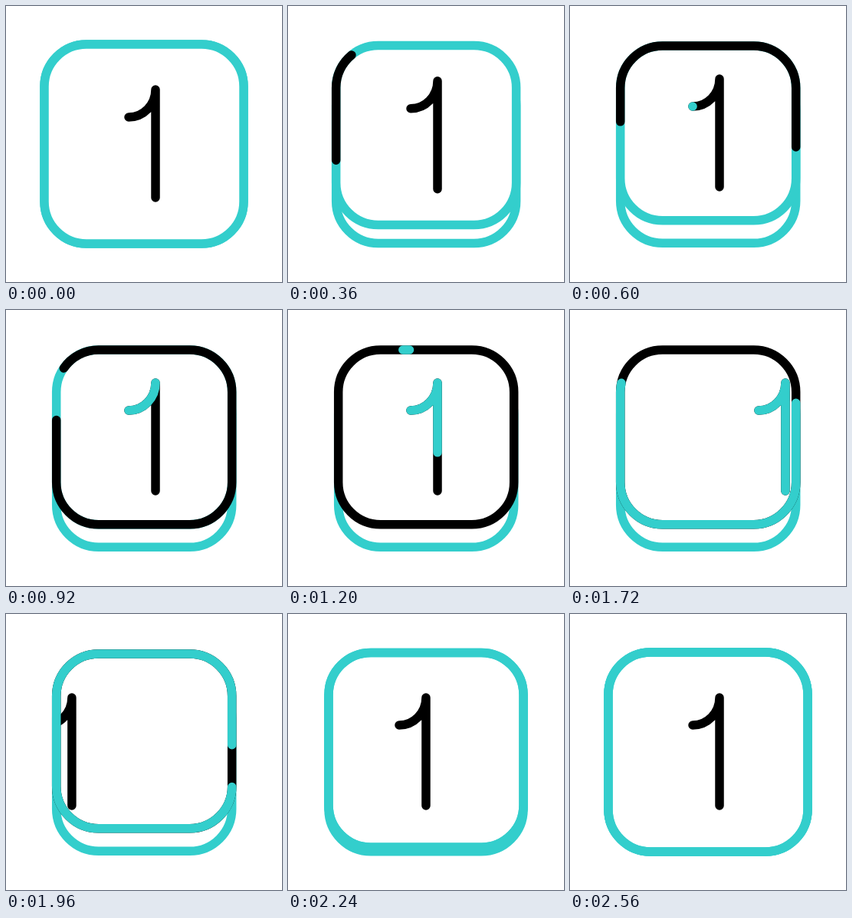
Write an HTML page that moves like this. It is 360 by 360 pixels and loops after 2.8 s.

```html
<!DOCTYPE html>
<html lang="en">
<head>
<meta charset="utf-8">
<style>
  html, body { margin: 0; width: 100%; height: 100%; overflow: hidden; background: #fff; }
  svg { display: block; width: 100vw; height: 100vh; }
  path { fill: none; stroke-width: 11.5; stroke-linecap: round; stroke-linejoin: round; }
  .teal { stroke: #33cecc; }
  .black { stroke: #000; }
  #face { fill: #fff; }
</style>
</head>
<body>
<svg viewBox="0 0 360 360">
  <defs>
    <clipPath id="window"><path id="clip"/></clipPath>
  </defs>
  <path id="base" class="teal"/>
  <path id="face"/>
  <g clip-path="url(#window)">
    <g id="current">
      <path class="black" d="M160 145A35 36 0 0 0 195 109V250"/>
      <path id="ink" class="teal" pathLength="1" d="M160 145A35 36 0 0 0 195 109V250"/>
    </g>
    <g id="next">
      <path class="black" d="M160 145A35 36 0 0 0 195 109V250"/>
    </g>
  </g>
  <path id="rim"/>
  <path id="runner" pathLength="1"/>
</svg>
<script>
  const LOOP = 2800, STEP = 40, RADIUS = 55, PERIMETER = 818;
  const $ = id => document.getElementById(id);
  const [clip, base, face, current, ink, next, rim, runner] =
    ['clip', 'base', 'face', 'current', 'ink', 'next', 'rim', 'runner'].map($);

  const span = (t, from, length) => Math.min(1, Math.max(0, (t - from) / length));
  const sine = u => (1 - Math.cos(Math.PI * u)) / 2;
  const cubic = u => u < 0.5 ? 4 * u ** 3 : 1 - 4 * (1 - u) ** 3;

  function roundRect(left, top, right, bottom) {
    const r = RADIUS, w = right - left - 2 * r, h = bottom - top - 2 * r;
    const arc = (dx, dy) => `a${r} ${r} 0 0 1 ${dx} ${dy}`;
    return `M${left + r} ${top}h${w}${arc(r, r)}v${h}${arc(-r, r)}` +
      `h${-w}${arc(-r, -r)}v${-h}${arc(r, -r)}z`;
  }

  // Shows the part of a path from start to start + length, wrapping at its end.
  function trim(path, start, length) {
    path.style.display = length > 0 ? '' : 'none';
    const full = length >= 1;
    path.setAttribute('stroke-dasharray', full ? 'none' : `${length} ${1 - length}`);
    path.setAttribute('stroke-dashoffset', full ? 0 : -(start % 1));
  }

  // The runner's tail keeps speeding up along the rim.
  function tailAt(t) {
    const d = t - 600;
    return (688 + 0.2112 * d + 0.00009 * d * d) / PERIMETER;
  }

  function draw(t) {
    const lift = cubic(span(t, 80, 440)) - cubic(span(t, 1960, 440));
    const left = 50 + 15.7 * lift, right = 310 - 15.3 * lift;
    const front = roundRect(left, 50 + 2 * lift, right, 310 - 30.3 * lift);
    for (const path of [clip, face, rim, runner]) path.setAttribute('d', front);
    base.setAttribute('d', roundRect(left, 50 + 31 * lift, right, 310 - 0.7 * lift));

    const first = sine(span(t, 80, 1035)), second = sine(span(t, 1135, 990));
    const dark = first >= 1;
    rim.setAttribute('class', dark && second < 1 ? 'black' : 'teal');
    runner.setAttribute('class', dark ? 'teal' : 'black');
    trim(runner, tailAt(t), dark ? second : first);

    const leave = sine(span(t, 1500, 420)), enter = sine(span(t, 1740, 629));
    current.style.display = leave < 1 ? '' : 'none';
    current.setAttribute('transform', `translate(${160 * leave} ${-14 * lift})`);
    const inked = sine(span(t, 590, 920));
    ink.style.display = inked > 0 ? '' : 'none';
    ink.setAttribute('stroke-dasharray', inked < 1 ? `${inked} 2` : 'none');

    next.style.display = enter > 0 ? '' : 'none';
    next.setAttribute('transform', `translate(${-150 * (1 - enter)} 0)`);
  }

  const began = performance.now();
  function tick() {
    const t = (performance.now() - began) % LOOP;
    draw(Math.floor(t / STEP) * STEP);
    requestAnimationFrame(tick);
  }
  draw(0);
  requestAnimationFrame(tick);
</script>
</body>
</html>
```
